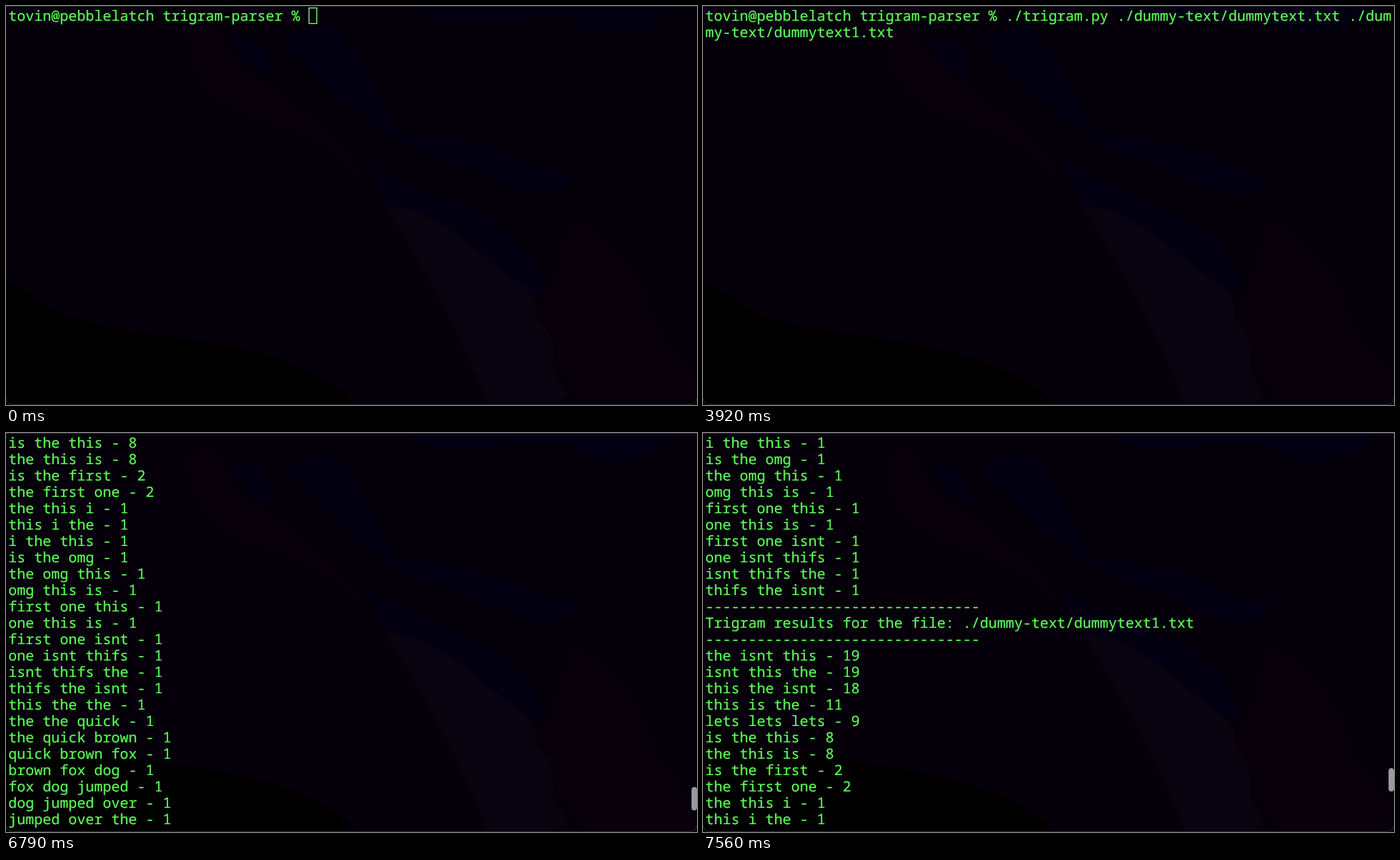
These frames come from a looping animation (886x512 px, 8 s). An HTML page:

```html
<!DOCTYPE html>
<html lang="en">
<head>
<meta charset="utf-8">
<title>Terminal</title>
<style>
  html, body { margin: 0; width: 100%; height: 100%; overflow: hidden; background: #05000a; }
  svg { display: block; width: 886px; height: 512px; }
  text {
    font: 18.333px "Noto Sans Mono", "DejaVu Sans Mono", monospace;
    fill: #5fff58;
    stroke: #5fff58;
    stroke-width: .2px;
    white-space: pre;
    text-rendering: geometricPrecision;
    font-variant-ligatures: none;
  }
</style>
</head>
<body>
<svg viewBox="0 0 886 512">
  <rect width="886" height="512" fill="#05000a"/>
  <g fill="#08000b">
    <path d="M235 28L270 25C280 60 300 85 340 105C380 140 430 170 468 235C420 170 360 155 300 135C260 110 235 90 235 28Z"/>
    <path d="M723 275C770 290 820 350 830 410C850 440 880 470 886 488V512H740L700 440L680 395C705 360 715 320 723 275Z"/>
  </g>
  <g fill="#030012">
    <path d="M350 42L418 22C445 55 472 95 500 160C540 166 580 168 618 180C655 196 695 218 730 214C726 246 685 250 640 230C590 200 530 194 490 165C445 140 400 90 350 42Z"/>
    <path d="M455 190C500 230 560 243 600 265C640 285 692 320 690 372C640 352 600 310 550 276C520 262 495 260 484 246Z"/>
    <path d="M288 38L328 45L345 92Q305 88 288 38Z"/>
    <path d="M520 0H860Q840 32 790 35Q735 36 715 12Q620 22 540 18Z"/>
  </g>
  <path fill="#09040f" d="M487 258C530 254 585 296 630 336C665 360 688 376 680 400C702 420 706 445 700 465L720 500L700 512H618C592 440 540 340 487 258Z"/>
  <path fill="#000" d="M0 350C40 375 70 402 130 412C200 424 270 430 340 450C390 465 425 485 445 506V512H0Z"/>
  <path fill="none" stroke="#29252f" d="M0 .5H886M0 503Q1 511.5 9 511.5H877Q885 511.5 886 503"/>
  <rect id="cursor"/>
  <g id="rows"></g>
  <rect id="thumb" x="879" width="7" height="30" rx="3.5" fill="#9b999d"/>
</svg>
<script>
const LOOP = 8000, STEP = 70, ROWS = 24, COLS = 80;
const X0 = 3, Y0 = 2, CW = 11, RH = 21;
const $ = id => document.getElementById(id);

const prompt = 'tovin@pebblelatch trigram-parser % ';
const files = ['./dummy-text/dummytext.txt', './dummy-text/dummytext1.txt'];
const command = prompt + './trigram.py ' + files.join(' ');
const typed = [command.slice(0, COLS), command.slice(COLS)];

// Every run of three neighbouring words, each counted once
const trigrams = s => {
  const w = s.split(' ');
  return w.slice(2).map((_, i) => w.slice(i, i + 3).join(' ') + ' - 1');
};
const top3 = ['the isnt this - 19', 'isnt this the - 19', 'this the isnt - 18'];
const common = [
  'is the this - 8', 'the this is - 8', 'is the first - 2', 'the first one - 2',
  ...trigrams('the this i the this'), ...trigrams('is the omg this is'),
  ...trigrams('first one this is'), ...trigrams('first one isnt thifs the isnt')
];
const story = trigrams('this the the quick brown fox dog jumped over the lazy lorem ipsum ' +
  'block of text and this is a runon sentence lets lets unusual whitespace lets tl tltltltltltltlt');
const rule = '-'.repeat(32);
const head = file => [rule, 'Trigram results for the file: ' + file, rule];

const first = [...typed, ...head(files[0]), ...top3, 'this is the - 10', ...common];
const all = [...first, ...head(files[1]), ...top3, 'this is the - 11',
  'lets lets lets - 9', ...common, ...story];

// Start time and lines on screen; the cursor follows the last line
const screens = [
  [0, [prompt]],
  [1540, typed],
  [4060, [...typed, '']],
  [4130, [...first, '']],
  [4480, [...all, '']],
  [4620, [...all, prompt]]
];
const blinks = [[1330, 1540], [2870, 3430], [3920, 4060], [5530, 6090]];
const SCROLL_AT = 6440;
const scroll = [1, 3, 7, 11, 16, 20, 23, 25, 27, 28, 29, 30, 31, 33, 35, 37, 38];

const rows = Array.from({ length: ROWS }, (_, i) => {
  const el = document.createElementNS('http://www.w3.org/2000/svg', 'text');
  el.setAttribute('x', X0);
  el.setAttribute('y', Y0 + 17 + i * RH);
  $('rows').append(el);
  return el;
});

function set(el, attrs) {
  for (const k in attrs) el.setAttribute(k, attrs[k]);
}

// Hollow while the window has no focus, then solid with a soft edge
function drawCursor(t, row, col) {
  const hollow = t < 770;
  const off = row >= ROWS || blinks.some(([a, b]) => t >= a && t < b);
  const inset = hollow ? .5 : 0;
  set($('cursor'), {
    x: X0 + col * CW + inset, y: Y0 + row * RH + inset,
    width: CW - 2 * inset, height: RH - 2 * inset,
    fill: hollow ? 'none' : '#3cff2e',
    stroke: hollow ? '#78ff72' : '#3cff2e',
    'stroke-width': hollow ? 1.2 : 2,
    'stroke-opacity': hollow ? 1 : .35,
    visibility: off ? 'hidden' : 'visible'
  });
}

function draw(t) {
  const lines = screens.filter(s => s[0] <= t).pop()[1];
  const step = Math.min(scroll.length - 1, Math.floor((t - SCROLL_AT) / STEP));
  const back = step < 0 ? 0 : scroll[step];
  const top = Math.max(0, lines.length - ROWS) - back;
  rows.forEach((el, i) => {
    const s = lines[top + i] || '';
    if (el.textContent !== s) el.textContent = s;
  });
  const last = lines.length - 1;
  drawCursor(t, last - top, lines[last].length);
  set($('thumb'), { y: 481 - back * 1.343, visibility: back ? 'visible' : 'hidden' });
}

const start = performance.now();
function tick() {
  draw((performance.now() - start) % LOOP);
  requestAnimationFrame(tick);
}
tick();
</script>
</body>
</html>
```
